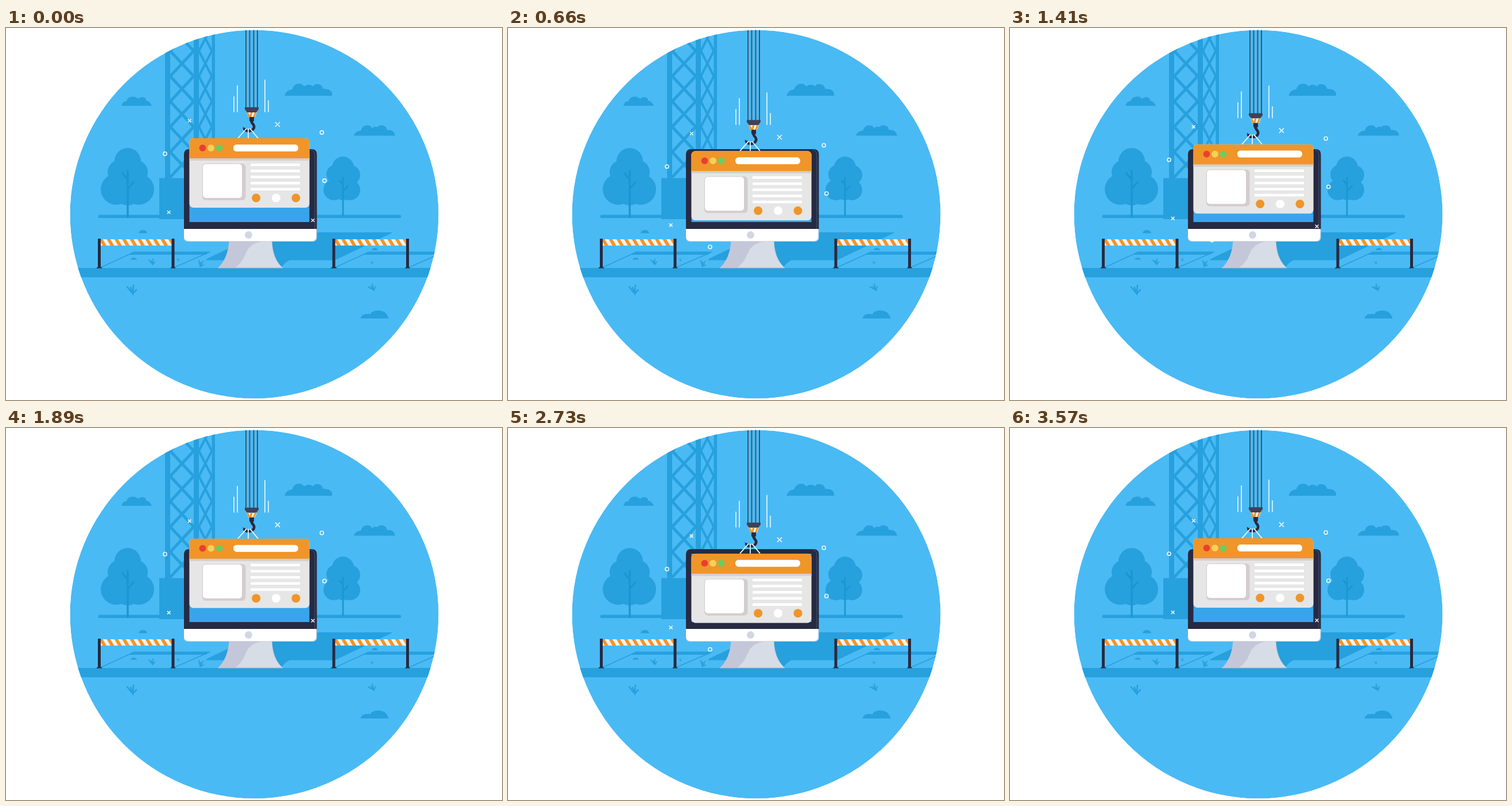
Recreate the animation shown at these times as an HTML page. Size 864 by 648 pixels, loop 3600 ms.

```html
<!DOCTYPE html>
<html lang="en">
<head>
<meta charset="utf-8">
<title>Under construction</title>
<style>
  html, body { margin: 0; width: 100%; height: 100%; overflow: hidden; background: #fff; }
  svg { display: block; width: 864px; height: 648px; }
  .sky { fill: #4abaf4; }
  .deep { fill: #27a0de; }
  .line { fill: none; stroke: #27a0de; }
  .trunk { fill: none; stroke: #1c96d2; stroke-linecap: round; }
  .ink { fill: #272a42; }
  .orange { fill: #f09529; }
  .white { fill: #fff; }
  .spark { fill: none; stroke: #fff; stroke-opacity: .9; stroke-width: 1.6; }
</style>
</head>
<body>
<svg viewBox="0 0 864 648">
  <defs>
    <clipPath id="disc"><circle cx="432.5" cy="324.5" r="321"/></clipPath>
    <clipPath id="card"><rect x="319.5" y="192" width="209" height="121" rx="7"/></clipPath>
    <pattern id="tape" width="13.4" height="11" patternUnits="userSpaceOnUse" x="162" y="368">
      <path fill="#f5f3f1" d="M0 0h13.4v11H0z"/>
      <path class="orange" d="M0 0h6.5l6.5 11H6.5z"/>
    </pattern>
    <g id="fence">
      <path fill="url(#tape)" d="M162 368h129v11H162z"/>
      <path class="ink" d="M160 367h5v49l3 2.5h-11l3-2.5zM288.5 367h5v49l2 2.5h-9l2-2.5z"/>
    </g>
    <g id="fenceShade">
      <path class="deep" d="M222 389.5h135l-9 5.5H213z"/>
      <path class="line" stroke-width="1.5" d="M165 417l57-26M293 417l58-25"/>
    </g>
    <path id="grass" class="line" stroke-width="2.6" stroke-linecap="round" d="M-8-6L2 6L3-9M2 6L8-1M2 6L-2-5"/>
  </defs>

  <g clip-path="url(#disc)">
    <circle class="sky" cx="432.5" cy="324.5" r="321"/>

    <g class="deep">
      <path d="M277 0h9v264h-9zM327 0h9v264h-9zM358.5 0h5.5v264h-5.5zM267 261.5h97V333h-97z"/>
      <path d="M201 135.500q2-8 9-8q2-8 11-8q6 0 9 4q4-4 9-3q5 1 5 6q7 1 10 9z"/>
      <path d="M485.500 118q2-10 13-11q3-10 12-10q6 0 9 5q4-4 9-3q4 0 6 3q3-5 9-4q7 0 9 8q11-1 15 6q1 3 0 6z"/>
      <path d="M605.500 187.500q3-8 13-9q2-9 11-9q6 0 8 5q4-4 9-2q3-3 9-3q7 1 8 8q11-1 14 8v2z"/>
      <path d="M617.500 506q2-8 11-8q4 0 6 1q3-7 14-7q14 0 18 14z"/>
      <path d="M231 357.500q1-5.500 7.500-5.500t7.500 5.500zM217 403.500q1-3.500 5.500-3.500t5.500 3.500zM637 387q1-4 5.500-4t5.500 4z"/>
    </g>
    <path id="lattice" class="line" stroke-width="5"/>
    <path id="thinLattice" class="line" stroke-width="4"/>

    <rect class="deep" x="160.500" y="325.500" width="527.500" height="5.500" rx="2.500"/>
    <g id="trees" class="deep"></g>
    <path class="trunk" stroke-width="3.400" d="M212 249v80M212 280l10-11M211 263l-8-10"/>
    <path class="trunk" stroke-width="2.800" d="M587 261v65M587 284l9-9M587 273l-6-7"/>

    <path class="deep" d="M460 356h213q-2 2-7 4L573 404.500h-79q-9 4-15 13.500h-90V404.500h-41q2-3 7-5l40-19z"/>
    <use href="#fenceShade"/>
    <use href="#fenceShade" x="408.500"/>
    <use href="#grass" transform="translate(219 457)"/>
    <use href="#grass" transform="translate(254 408) scale(.65)"/>
    <use href="#grass" transform="translate(300 404) scale(.33)"/>
    <use href="#grass" transform="translate(339 411) rotate(25) scale(.68)"/>
    <use href="#grass" transform="translate(637 409) scale(.33)"/>
    <use href="#grass" transform="translate(638 453) rotate(-20) scale(.75)"/>
    <path class="deep" d="M100 418h660v16.300H100z"/>
    <use href="#fence"/>
    <use href="#fence" x="408.500"/>

    <path fill="#c4c7da" d="M388.500 370h75q1 32 18.500 48H369q18-17 19.500-48z"/>
    <path fill="#d6dde7" d="M447 372h15.500q1 30 19.500 46h-84q13-8 19-24q7-19 29-22z"/>
    <path fill="#b9bfd0" d="M370 417h111l1 1.500H369z"/>
    <path class="ink" d="M310 351V220q0-9 9-9h213q9.500 0 9.500 9v131z"/>
    <path fill="none" stroke="#465470" d="M531 212.500q7 1 7 9V350"/>
    <path fill="#38a5eb" d="M319.500 219h209v119h-209z"/>
    <path fill="#d3d7e2" d="M310 350h231.500v14q0 8-8 8H318q-8 0-8-8z"/>
    <path class="white" d="M310 350h230v13q0 8-8 8H318q-8 0-8-8z"/>
    <circle cx="422.500" cy="360.500" r="6.500" fill="#d0d7e4"/>

    <g id="load">
      <path fill="none" stroke="#3b5269" stroke-width="1.900" d="M418 -40V139M424.500 -40V139M431.500 -40V139M438 -40V139"/>
      <path class="spark" stroke-width="1.500" d="M397 119v27.500M403 100v46.500M451 90v56.500M457 126v20.500"/>
      <path fill="#3f4158" d="M416 138h24v3.500l-4 5.500h-16l-4-5.500z"/>
      <path class="white" d="M419 147h18l-3 8h-12z"/>
      <path class="orange" d="M419 147h3l4 8h-4zM426 147h3.500l-2 8H424zM433 147h3.500l-3 8H430z"/>
      <path class="ink" d="M424 155h8v6l-1 2h-6l-1-2z"/>
      <path fill="none" stroke="#272a42" stroke-width="4.500" d="M427.500 161q0 4 3 6.500c5 7-2 12-8 12q-6 0-8-5"/>
      <path class="ink" d="M412.500 172l6 4-4 3z"/>
      <path fill="none" stroke="#eaf6fd" stroke-width="1.800" d="M404 192l15-17M422 192v-17M439 192l-14-17"/>

      <g clip-path="url(#card)">
        <path fill="#e6e6e6" d="M319 192h210v121H319z"/>
        <path fill="#d3ced1" d="M319 226h210v5H319z"/>
        <path class="orange" d="M319 192h210v35H319z"/>
      </g>
      <circle cx="342.500" cy="209" r="5.900" fill="#e83f32"/>
      <circle cx="357" cy="209" r="5.900" fill="#f5d05c"/>
      <circle cx="371.500" cy="209" r="5.900" fill="#67ce62"/>
      <rect class="white" x="396" y="203" width="113" height="12" rx="5.500"/>
      <rect x="342" y="236" width="75.500" height="64" rx="6" fill="#d5cccf"/>
      <rect class="white" x="343" y="237" width="68" height="59" rx="5"/>
      <path stroke="#fff" stroke-width="4.500" d="M426 238.200h86M426 248.900h86M426 259.500h86M426 270.200h86M426 280.800h86"/>
      <circle class="orange" cx="435.700" cy="296" r="7.500"/>
      <circle class="white" cx="470.500" cy="296" r="7.500"/>
      <circle class="orange" cx="505" cy="296" r="7.500"/>
      <path id="sparks" class="spark"/>
    </g>
  </g>
</svg>
<script>
  const PERIOD = 1800, STEP = 30, DROP = 26.7;
  const $ = id => document.getElementById(id);

  function crosses(x, w, first, pitch, end) {
    let d = '';
    for (let y = first; y < end; y += pitch)
      d += `M${x} ${y}l${w} ${pitch}M${x + w} ${y}l${-w} ${pitch}`;
    return d;
  }
  $('lattice').setAttribute('d', crosses(286, 41, -4, 44, 260));
  $('thinLattice').setAttribute('d', crosses(336, 22.5, -4, 44, 260));

  const leaves = [
    [212, 232, 23], [198, 251, 21], [226, 251, 21], [192, 281, 27], [231, 281, 27], [212, 284, 25],
    [587, 243, 19], [575, 255, 17], [600, 256, 17], [571, 282, 18], [599, 282, 18], [587, 284, 16]
  ];
  $('trees').innerHTML = leaves.map(([x, y, r]) => `<circle cx="${x}" cy="${y}" r="${r}"/>`).join('');

  const cross = ([x, y, r]) =>
    `M${x - r} ${y - r}l${2 * r} ${2 * r}M${x + r} ${y - r}l${-2 * r} ${2 * r}`;
  const ring = ([x, y, r]) =>
    `M${x - r} ${y}a${r} ${r} 0 1 1 ${2 * r} 0a${r} ${r} 0 1 1 ${-2 * r} 0`;
  $('sparks').setAttribute('d',
    [[319.7, 161.5, 2.8], [473, 168, 4], [283.7, 321, 2.8], [534.5, 335, 2.8]].map(cross).join('') +
    [[550.2, 182, 3.1], [277, 219, 3.1], [554.8, 266, 3.1], [352, 359, 3.1]].map(ring).join(''));

  const load = $('load');
  const start = performance.now();
  function draw(now) {
    const t = Math.floor(Math.max(0, now - start) / STEP) * STEP;
    const y = DROP * (1 - Math.cos(2 * Math.PI * t / PERIOD)) / 2;
    load.setAttribute('transform', `translate(0 ${y.toFixed(2)})`);
    requestAnimationFrame(draw);
  }
  draw(start);
</script>
</body>
</html>
```
